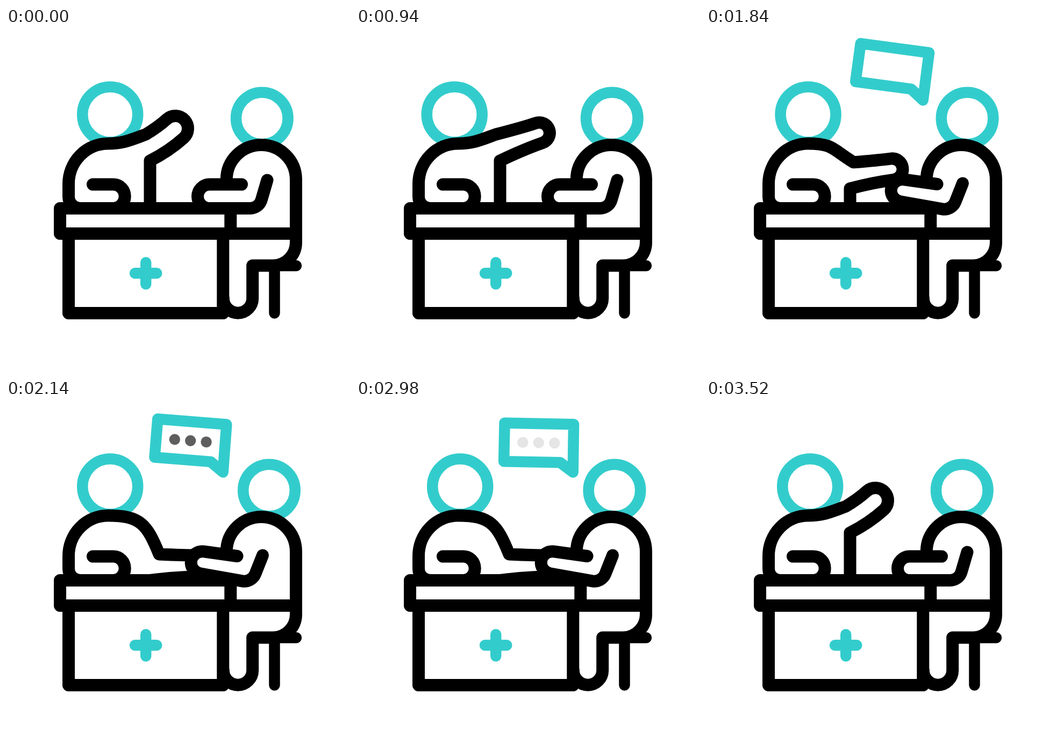
These frames come from a looping animation (640 px wide and 640 px high, 3.6 s). An HTML page with a canvas:

```html
<!DOCTYPE html>
<html lang="en">
<head>
<meta charset="utf-8">
<title>Consultation</title>
<style>
  html, body { margin: 0; width: 100%; height: 100%; overflow: hidden; background: #fff; }
  canvas { display: block; width: 640px; height: 640px; }
</style>
</head>
<body>
<canvas id="stage" width="640" height="640"></canvas>
<script>
const ctx = document.getElementById('stage').getContext('2d');
const LOOP = 3600, TEAL = '#33cccc', BLACK = '#000';
const THICK = 23, THIN = 20.5, DEG = Math.PI / 180;

// Hand of the patient's raised arm: centre, radius and pointing angle.
const RAISED = { x: 315, y: 187, r: 23.5, aim: -42 };
const OUT = { x: 346.5, y: 193, r: 19.5, aim: -20 };
const BENT = { x: 334, y: 198, r: 19.5, aim: -18 };
const DOWN = { x: 355, y: 309, r: 20, aim: 0 };
const WAVE_START = 420, WAVE_STEP = 340, WAVE_END = WAVE_START + 3 * WAVE_STEP;

const mix = (a, b, k) => a + (b - a) * k;

function mixHand(a, b, k) {
  const hand = {};
  for (const key in a) hand[key] = mix(a[key], b[key], k);
  return hand;
}

function ease(t, from, to) {
  const u = Math.min(1, Math.max(0, (t - from) / (to - from)));
  return u * u * (3 - 2 * u);
}

// Rises from 0 to 1, holds, and falls back.
const pulse = (t, rise, top, fall, end) => ease(t, rise, top) - ease(t, fall, end);

function stroke(path, width = THICK, color = BLACK, fill) {
  if (fill) {
    ctx.fillStyle = fill;
    ctx.fill(path);
  }
  ctx.lineWidth = width;
  ctx.strokeStyle = color;
  ctx.stroke(path);
}
const line = (d, width, color) => stroke(new Path2D(d), width, color);

function ring(x, y, r) {
  const path = new Path2D();
  path.arc(x, y, r, 0, Math.PI * 2);
  stroke(path, THIN, TEAL);
}

function patientHand(t, slump) {
  const steps = (Math.min(t, WAVE_END) - WAVE_START) / WAVE_STEP;
  const sway = steps < 0 ? 0 : (1 - Math.cos(steps * Math.PI)) / 2;
  const waving = mixHand(mixHand(RAISED, OUT, ease(t, 0, WAVE_START)), BENT, sway);
  return mixHand(t < 3000 ? waving : RAISED, DOWN, slump);
}

function drawPatient(t) {
  ring(193.7 - 10.5 * pulse(t, 0, 400, 1480, 2080), 161, 51.5);

  const slump = pulse(t, 1480, 2130, 3000, 3510);
  const { x, y, r, aim } = patientHand(t, slump);
  const angle = aim * DEG, dx = Math.cos(angle), dy = Math.sin(angle);
  const top = [x + r * dy, y - r * dx], bottom = [x - r * dy, y + r * dx];
  const creaseX = mix(260, 285, slump), creaseY = mix(198, 287, slump);
  const slope = mix(-20, 68, slump) * DEG, pull = mix(28, 60, slump);

  const path = new Path2D('M138 335.5A21.5 21.5 0 0 1 116.5 314V290A73.5 75 0 0 1 190 215');
  path.bezierCurveTo(190 + pull, 215,
    creaseX - pull * Math.cos(slope), creaseY - pull * Math.sin(slope), creaseX, creaseY);
  path.quadraticCurveTo(top[0] - 22 * dx, top[1] - 22 * dy, ...top);
  path.arc(x, y, r, angle - Math.PI / 2, angle + Math.PI / 2);
  path.quadraticCurveTo(bottom[0] - 36 * dx, bottom[1] - 36 * dy, 268, mix(247, 335.5, slump));
  path.lineTo(268, 335.5);
  stroke(path, THICK, BLACK, '#fff');

  line('M161.5 291H200A21.2 22.2 0 0 1 200 335.4');
}

function drawDesk() {
  line('M100.5 335.5H417.8V382.5H100.5Z');
  line('M404 382.5H539.5');
  line('M116.5 382.5H403.8V530.5H116.5Z');
  line('M240 456.3H280.3M260.2 436.3V476.5', THIN, TEAL);
}

function drawDoctor(t) {
  ring(476.3 + 13.2 * pulse(t, 1480, 2020, 2200, 3500), 168, 48.3);
  line('M410.3 285V282A64.6 64.6 0 0 1 539.5 282V399A43 43 0 0 1 496.5 442H458.7V503A27.2 27.2 0 0 1 404.3 503');
  line('M465 442.3H540M499.5 442V530.5', THIN);
}

function drawForearm(t) {
  const reach = pulse(t, 1480, 1830, 3000, 3500);
  const turn = 8.3 * DEG * reach;
  const endX = mix(486, 477.5, reach), endY = mix(283, 289, reach);
  const path = new Path2D();
  path.moveTo(mix(438.5, 430, reach), mix(291, 290.5, reach));
  path.arc(mix(378.8, 365, reach), mix(313.3, 302.5, reach), mix(22.3, 20.8, reach),
    turn - Math.PI / 2, turn + Math.PI / 2, true);
  path.arcTo(mix(470.6, 457.3, reach), mix(335.5, 340, reach), endX, endY, 22);
  path.lineTo(endX, endY);
  stroke(path, THICK, BLACK, '#fff');
}

// Drawn around the tip of the tail, which is also the pivot.
function drawBubble(t) {
  const shown = pulse(t, 1480, 1810, 3000, 3440);
  if (shown < 0.002) return;
  const outline = 430;
  ctx.save();
  ctx.translate(403.7, 134.3);
  ctx.rotate((10.8 - 6.2 * ease(t, 1640, 2040) - 4.6 * ease(t, 2700, 3120)) * DEG);
  if (shown < 1) ctx.setLineDash([outline * shown, outline * 2]);
  line('M0 0L-24.4 -17.5H-129V-89H-0.5L0 0', THIN, TEAL);

  ctx.globalAlpha = pulse(t, 2000, 2240, 2740, 3040);
  ctx.fillStyle = BLACK;
  for (let i = 0; i < 3; i++) {
    ctx.beginPath();
    ctx.arc(-94.5 + 29.5 * i, -53.5, 10.2, 0, Math.PI * 2);
    ctx.fill();
  }
  ctx.restore();
}

function render() {
  const t = performance.now() % LOOP;
  ctx.fillStyle = '#fff';
  ctx.fillRect(0, 0, 640, 640);
  ctx.lineCap = ctx.lineJoin = 'round';
  drawPatient(t);
  drawDoctor(t);
  drawForearm(t);
  drawDesk();
  drawBubble(t);
  requestAnimationFrame(render);
}
render();
</script>
</body>
</html>
```
